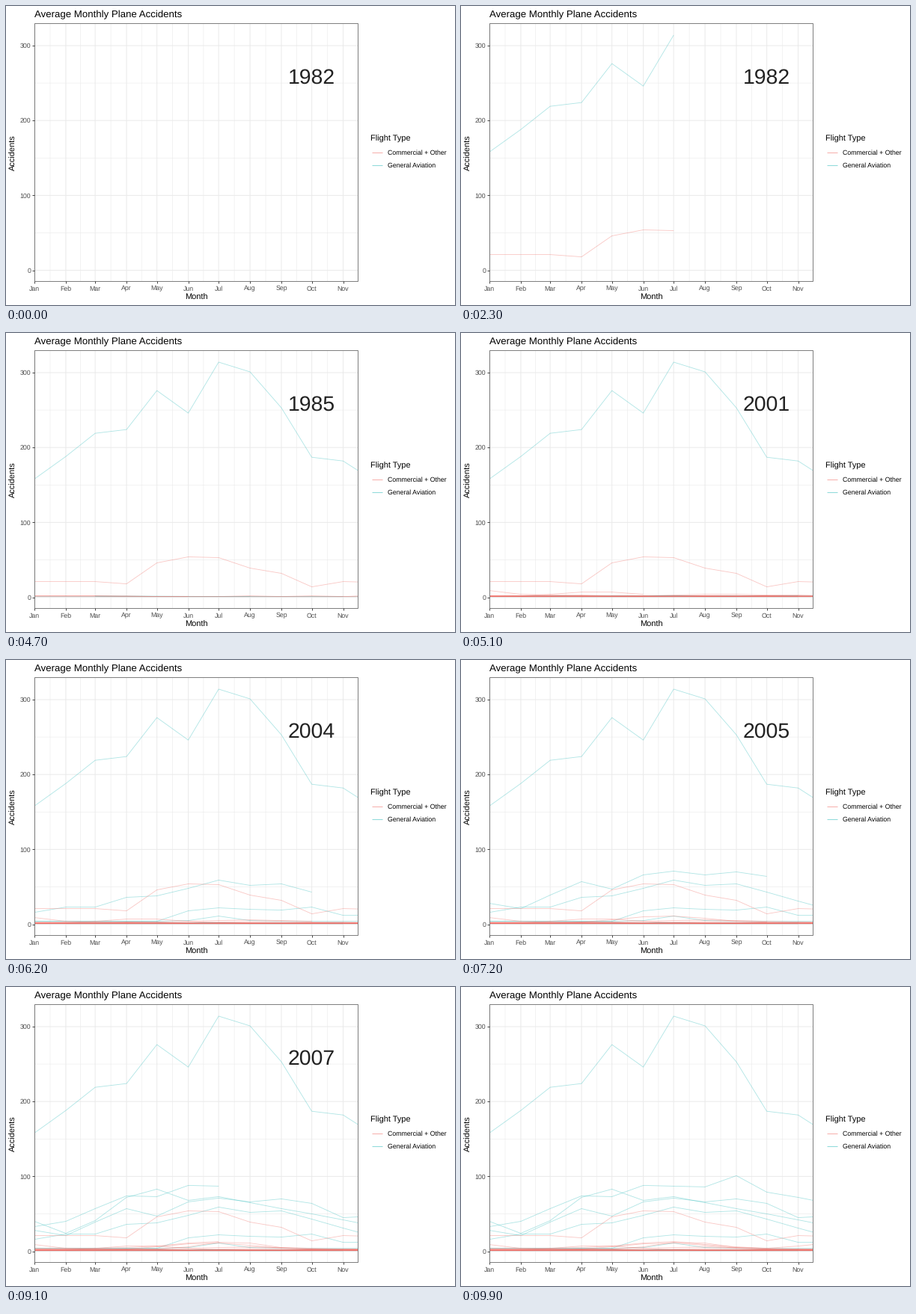
Write a matplotlib script that moves like this. It is 600x400 px and loops after 10 s.

```python
import random

import numpy as np
import matplotlib as mpl
import matplotlib.pyplot as plt
from matplotlib.animation import FuncAnimation
from matplotlib.patches import Rectangle

mpl.rcParams.update({"font.family": "Liberation Sans", "text.hinting": "none"})

W, H, DPI = 600, 400, 100
PX = 72 / DPI  # points per pixel
FRAMES, INTERVAL = 100, 100
LEFT, RIGHT, TOP, BOTTOM = 38, 470.4, 23.4, 368.4
RED, BLUE = "#F2736C", "#38BFBF"
ALPHA, LINE = 0.4, 0.85
MONTHS = "Jan Feb Mar Apr May Jun Jul Aug Sep Oct Nov".split()
FIRST, LAST = 1982, 2007
YEARS = range(FIRST, LAST + 1)

index = np.arange(12)
days = np.array([np.datetime64(f"2000-{m + 1:02}-01") for m in index])
MONTH_X = LEFT + 1.3525 * (days - days[0]).astype(int)


def curve(*points):
    """Twelve monthly counts through (month, count) key points."""
    return np.interp(index, *zip(*points)).round()


def summer(base, peak, center=6, width=1.6):
    return np.round(base + peak * np.exp(-((index - center) / width) ** 2))


general = {
    1982: curve((0, 158), (2, 219), (3, 224), (4, 276), (5, 246), (6, 314),
                (7, 301), (8, 253), (9, 187), (10, 182), (11, 156)),
    2002: summer(4, 7, width=0.7),
    2003: curve((0, 4), (4, 4), (5, 18), (6, 22), (8, 19), (9, 23), (10, 12), (11, 12)),
    2004: curve((0, 16), (1, 23), (2, 23), (3, 36), (4, 38), (6, 59), (7, 52),
                (8, 54), (11, 20)),
    2005: curve((0, 28), (1, 21), (3, 57), (4, 47), (5, 66), (6, 71), (7, 66),
                (8, 70), (9, 64), (10, 45), (11, 47)),
    2006: curve((0, 40), (1, 24), (2, 41), (3, 72), (4, 83), (5, 68), (6, 73), (11, 34)),
    2007: curve((0, 33), (1, 40), (3, 74), (4, 73), (5, 88), (7, 86), (8, 101),
                (9, 79), (11, 64)),
}
commercial = {
    1982: curve((0, 21), (2, 21), (3, 18), (4, 46), (5, 54), (6, 53), (7, 39),
                (8, 32), (9, 14), (10, 21), (11, 20)),
    2000: curve((0, 9), (1, 4), (4, 2), (8, 4), (11, 2)),
    2001: summer(2, 5, 3.5),
    2004: summer(3, 3, 7),
    2005: summer(2, 9, 5.7, 2),
    2006: summer(3, 10, 6.4, 1.3),
    2007: summer(4, 9, 5.8, 1.7) + summer(0, 7, 11, 1.2),
}

# Quiet years: one or two accidents a month, some months without any.
rng = random.Random(7)
for year in YEARS:
    for table, chance in ((commercial, 0.8), (general, 0.35)):
        if year not in table:
            most = 3 if year > 2000 else 2
            table[year] = np.array([rng.choice([1, 1, 1, most])
                                    if rng.random() < chance else 0 for _ in index])


def month_index(year, month):
    return 12 * (year - FIRST) + month


# Time runs with the number of accidents, pinned at a few months.
totals = np.concatenate([general[y] + commercial[y] for y in YEARS])
cumulative = np.concatenate([[0], np.cumsum(totals)])
pins = [(0, 0), (month_index(1983, 0), 46.9), (month_index(2001, 6) + 0.5, 51.5),
        (month_index(2004, 9) + 0.5, 62.5), (month_index(2006, 9) + 0.5, 83.5),
        (len(totals), FRAMES - 0.5)]
pin_months, pin_times = zip(*pins)
pin_counts = np.interp(pin_months, np.arange(len(cumulative)), cumulative)
start = np.interp(cumulative[:-1], pin_counts, pin_times)


def to_y(value):
    return 353.6 - 1.002 * np.asarray(value, float)


fig = plt.figure(figsize=(W / DPI, H / DPI), dpi=DPI, facecolor="white")
ax = fig.add_axes([0, 0, 1, 1])
ax.set_xlim(0, W)
ax.set_ylim(H, 0)
ax.axis("off")


def segment(x, y, color, width, **kw):
    return ax.plot(x, y, color=color, lw=width * PX, solid_capstyle="butt", **kw)[0]


def label(x, y, text, size, color="black", **kw):
    return ax.text(x, y, text, fontsize=size * PX, color=color, **kw)


def grid(xs, ys, width):
    for y in ys:
        segment([LEFT, RIGHT], [y, y], "#EBEBEB", width, snap=False)
    for x in xs:
        segment([x, x], [TOP, BOTTOM], "#EBEBEB", width, snap=False)


breaks = np.arange(0, 301, 100)
grid((MONTH_X[:10] + MONTH_X[1:11]) / 2, to_y(breaks[:3] + 50), 0.6)
grid(MONTH_X[:11], to_y(breaks), 1.07)

for x, name in zip(MONTH_X, MONTHS):
    segment([x, x], [BOTTOM, BOTTOM + 2.8], "#333333", 0.9, zorder=5)
    label(x, 380.5, name, 8.8, "#4D4D4D", ha="center")
for value in breaks:
    y = float(to_y(value))
    segment([LEFT - 2.8, LEFT], [y, y], "#333333", 0.9, zorder=5)
    label(33.2, y + 3.2, str(value), 8.8, "#4D4D4D", ha="right")

label(38, 15, "Average Monthly Plane Accidents", 13.2)
label(254.3, 393, "Month", 11, ha="center")
label(10, 196, "Accidents", 11, rotation=90, ha="center", va="center")
label(487, 180.4, "Flight Type", 11)
for y, color, name in ((195.6, RED, "Commercial + Other"), (212.6, BLUE, "General Aviation")):
    segment([489, 503], [y, y], color, 1.07, alpha=0.55)
    label(510, y + 3.4, name, 8.8)

panel = Rectangle((LEFT, TOP), RIGHT - LEFT, BOTTOM - TOP, fc="none", ec="#7F7F7F",
                  lw=PX, zorder=4)
ax.add_patch(panel)
year_text = label(408.4, 103.4, "", 28.45, "#222222", ha="center", zorder=3)

# Each series: line, points, and the time each point appears.
series = []
for table, color, delay in ((general, BLUE, 0), (commercial, RED, 0.05)):
    for year in YEARS:
        counts = table[year]
        present = counts > 0
        first = month_index(year, 0)
        line = segment([], [], color, LINE, alpha=ALPHA, zorder=2.5, snap=False)
        line.set_clip_path(panel)
        series.append((line, MONTH_X[present], to_y(counts[present]),
                       start[first:first + 12][present] + delay))


def draw(frame):
    now = frame + 0.5
    for line, x, y, times in series:
        shown = times <= now
        line.set_data(x[shown], y[shown])
    current = np.searchsorted(start, now, side="right") - 1
    finished = frame == FRAMES - 1
    year_text.set_text("" if finished else str(FIRST + current // 12))
    return [line for line, *_ in series] + [year_text]


anim = FuncAnimation(fig, draw, frames=FRAMES, interval=INTERVAL, repeat=True,
                     repeat_delay=0)
plt.show()
```
